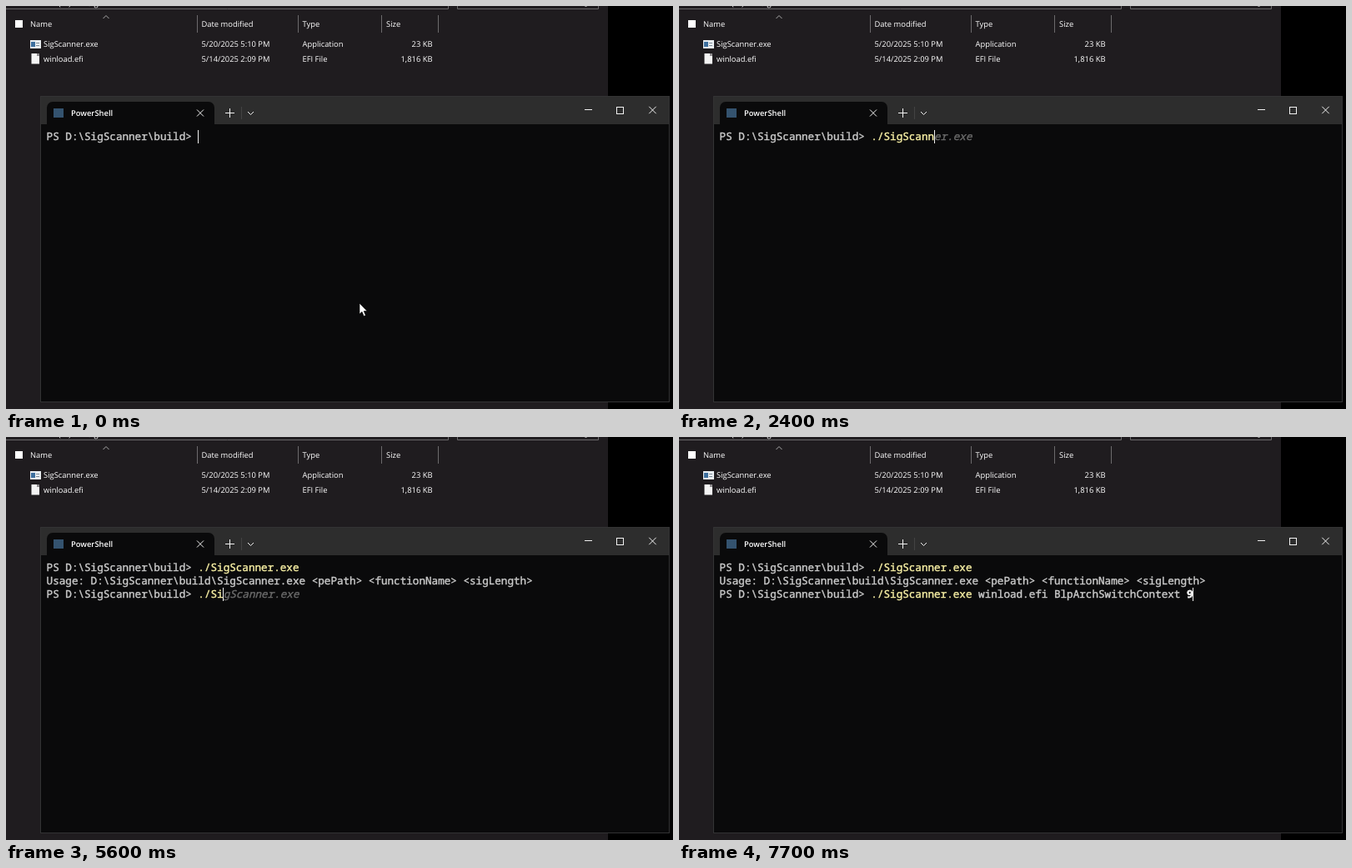
Write an HTML page with a canvas that moves like this. It is 800 px wide and 484 px high and loops after 8000 ms.

```html
<!DOCTYPE html>
<html lang="en">
<head>
<meta charset="utf-8">
<title>Terminal session</title>
<style>
html, body { margin: 0; width: 100%; height: 100%; overflow: hidden; background: #000; }
canvas { display: block; }
</style>
</head>
<body>
<canvas id="stage" width="800" height="484"></canvas>
<script>
const ctx = document.getElementById('stage').getContext('2d');
const LOOP = 8000, STEP = 100;
const UI = '"Open Sans", "Noto Sans", sans-serif';
const MONO = '"Noto Sans Mono", "DejaVu Sans Mono", monospace';
const GREY = '#cccccc', YELLOW = '#f9f1a5', GHOST = '#6a6a6a', WHITE = '#f2f2f2', RULE = '#6c6a6c';
const CELL = 7.573, LEFT = 48.6, BASE = 161, ROW = 16;

const PROMPT = 'PS D:\\SigScanner\\build> ';
const USAGE = 'Usage: D:\\SigScanner\\build\\SigScanner.exe <pePath> <functionName> <sigLength>';
const CMD = './SigScanner.exe';
const FULL = CMD + ' winload.efi BlpArchSwitchContext 9';

const RUN = 3400, OUTPUT = 3500, READY = 3600, ACCEPT = 7700, BLINK = 500;

// Typing rhythm: [time, characters typed], steady between the points
const FIRST = [[800, 0], [900, 1], [1400, 3], [1900, 6], [2100, 6], [2400, 10], [2900, 12], [3300, 16]];
const SECOND = [[5000, 0], [5200, 2], [6000, 6], [6100, 6], [6500, 12], [6600, 12], [7100, 18], [7300, 19]];

function typedAt(points, t) {
  const next = points.findIndex(([time]) => time > t);
  if (next === 0) return 0;
  if (next < 0) return points.at(-1)[1];
  const [t0, n0] = points[next - 1], [t1, n1] = points[next];
  return Math.floor(n0 + (n1 - n0) * (t - t0) / (t1 - t0));
}

function rect(x, y, w, h, color) {
  ctx.fillStyle = color;
  ctx.fillRect(x, y, w, h);
}

function line(color, ...points) {
  ctx.strokeStyle = color;
  ctx.lineWidth = 1;
  ctx.beginPath();
  for (let i = 0; i < points.length; i += 2) ctx.lineTo(points[i], points[i + 1]);
  ctx.stroke();
}

function label(text, x, y, align = 'left', weight = 400) {
  ctx.font = `${weight} 9.4px ${UI}`;
  ctx.textAlign = align;
  ctx.fillStyle = '#fff';
  ctx.fillText(text, x, y);
}

function cross(x, y, r) {
  line(WHITE, x - r, y - r, x + r, y + r);
  line(WHITE, x - r, y + r, x + r, y - r);
}

function chevron(x, y, r, dir, color) {
  line(color, x - r, y - dir * r, x, y, x + r, y - dir * r);
}

function explorer() {
  rect(0, 0, 800, 484, '#000');
  rect(0, 0, 722, 484, '#1f1c1f');
  label('(D:)', 63, 0);
  label('Sig', 98, 0);
  line(RULE, 0, 3.5, 530.5, 3.5, 530.5, 0);
  line(RULE, 541.5, 0, 541.5, 3.5, 710.5, 3.5, 710.5, 0);
  chevron(695.5, 1, 2.5, 1, '#bbb');

  rect(11, 17, 9, 9, '#fff');
  chevron(120, 11.5, 3.5, -1, '#aaa');
  for (const x of [229, 350, 450, 518]) rect(x, 11, 1, 21, RULE);
  label('Name', 29, 25);
  label('Date modified', 234.5, 25);
  label('Type', 355.5, 25);
  label('Size', 456, 25);

  const files = [['SigScanner.exe', '5/20/2025 5:10 PM', 'Application', '23 KB'],
    ['winload.efi', '5/14/2025 2:09 PM', 'EFI File', '1,816 KB']];
  files.forEach(([name, date, type, size], i) => {
    const y = 49 + i * 18;
    label(name, 45, y);
    label(date, 234.5, y);
    label(type, 355.5, y);
    label(size, 511.5, y, 'right');
  });

  rect(29, 41, 13, 10, '#e9eef2');
  rect(30, 43, 5, 6, '#3d6f9e');
  for (const y of [44, 47]) rect(36, y, 4, 1, '#7d8b96');
  rect(30.5, 57, 9.5, 12.5, '#f4f4f4');
  rect(37, 57, 3, 3, '#8e8c8e');
}

function windowFrame() {
  rect(41, 108, 755, 368, '#333334');
  rect(42, 109, 753, 33, '#2d2d2d');
  rect(42, 142, 753, 333, '#0a0a0b');
  ctx.fillStyle = '#0a0a0b';
  ctx.beginPath();
  ctx.roundRect(49, 115, 201, 28, [7, 7, 0, 0]);
  ctx.fill();
  rect(57, 123, 12, 11, '#34536f');
  label('PowerShell', 78, 132, 'left', 600);
  cross(233, 128.5, 4);
  rect(263, 128, 11, 1, WHITE);
  rect(268, 123, 1, 11, WHITE);
  rect(282, 121, 1, 15, '#424242');
  chevron(293.5, 130.5, 3.5, 1, WHITE);
  rect(694, 124, 9, 1, WHITE);
  ctx.strokeRect(732.5, 121.5, 8, 8);
  cross(775.5, 125, 4.2);
}

// One character per terminal cell, thickened by a thin outline
function print(text, col, row, color, style = '500') {
  ctx.font = `${style} 12.62px ${MONO}`;
  ctx.textAlign = 'left';
  ctx.fillStyle = ctx.strokeStyle = color;
  ctx.lineWidth = 0.4;
  [...text].forEach((c, i) => {
    const x = LEFT + (col + i) * CELL, y = BASE + row * ROW;
    ctx.fillText(c, x, y);
    ctx.strokeText(c, x, y);
  });
}

function caret(col, row) {
  rect(Math.round(LEFT + col * CELL - 0.3), 149 + row * ROW, 1, 16, WHITE);
}

function commandLine(n, row, editing) {
  const start = PROMPT.length, end = CMD.length;
  print(PROMPT, 0, row, GREY);
  if (n === 1) print('>', start - 2, row, '#e74856');
  print(FULL.slice(0, Math.min(n, end)), start, row, YELLOW);
  if (n > end) print(FULL.slice(end, n), start + end, row, GREY);
  if (n === FULL.length) print('9', start + n - 1, row, WHITE, '700');
  if (editing && n) print((n < end ? CMD : FULL).slice(n), start + n, row, GHOST, 'italic 500');
}

function session(t) {
  const first = typedAt(FIRST, t);
  const second = t < ACCEPT ? typedAt(SECOND, t) : FULL.length;
  commandLine(first, 0, t < RUN);
  if (t >= OUTPUT) print(USAGE, 0, 1, GREY);
  if (t >= READY) commandLine(second, 2, true);

  // The caret blinks only while the line is empty
  const ready = t >= READY, typed = ready ? second : first;
  const blinkOn = Math.floor((ready ? t + BLINK : t) / BLINK) % 2 === 0 || t < 4000 && ready;
  if (!typed && !blinkOn) return;
  if (t >= RUN && !ready) caret(0, t < OUTPUT ? 1 : 2);
  else caret(PROMPT.length + typed, ready ? 2 : 0);
}

function pointer(t) {
  const shown = t < 900 || t >= 1600 && t < 1700;
  if (!shown) return;
  const p = Math.min(1, t / BLINK);
  const x = 424 - 88 * p, y = 357 - 113 * p;
  const shape = [[0, 0], [0, 13], [3, 10.3], [5.2, 15.5], [7.4, 14.6], [5.2, 9.5], [9, 9.3]];
  ctx.beginPath();
  for (const [dx, dy] of shape) ctx.lineTo(x + dx, y + dy);
  ctx.closePath();
  ctx.fillStyle = '#fff';
  ctx.fill();
  ctx.lineWidth = 0.6;
  ctx.strokeStyle = '#000';
  ctx.stroke();
}

function draw(now) {
  const t = Math.floor(now % LOOP / STEP) * STEP;
  ctx.textRendering = 'geometricPrecision';
  explorer();
  windowFrame();
  session(t);
  pointer(t);
}

const begin = performance.now();
function tick() {
  draw(performance.now() - begin);
  requestAnimationFrame(tick);
}
tick();
</script>
</body>
</html>
```
